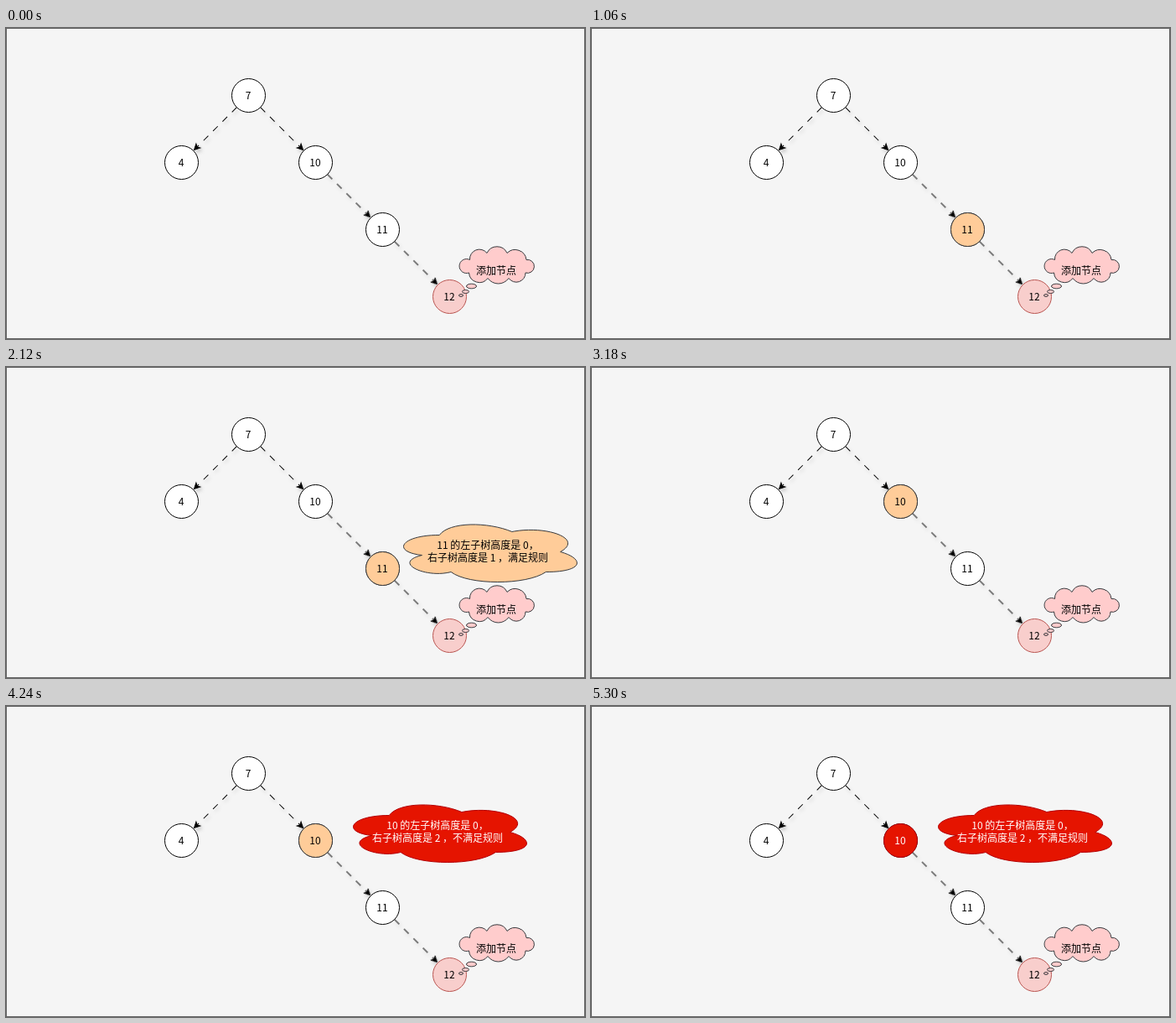
These frames come from a looping animation (691 px wide and 371 px high, 6360 ms). An HTML page:

```html
<!DOCTYPE html>
<html lang="zh-CN">
<head>
<meta charset="utf-8">
<title>二叉树添加节点</title>
<style>
  html, body { margin: 0; width: 100%; height: 100%; overflow: hidden; background: #f5f5f5; }
  svg { display: block; }
  text { font: 12px "Noto Sans CJK SC", "Noto Sans CJK", sans-serif; text-anchor: middle; fill: #000; stroke: none; }
  .plain { fill: #fff; stroke: #000; }
  .added { fill: #f8cecc; stroke: #b85450; }
  .bubble { fill: #fcc; stroke: #36393d; }
  .checked { fill: #fc9; stroke: #36393d; }
  .broken { fill: #e51400; stroke: #b20000; }
  .broken text { fill: #fff; }
  .edges { filter: drop-shadow(2px 3px 2px rgba(0, 0, 0, .2)); }

  /* --at: first step in which the part is visible; each step lasts 1060 ms */
  .step1, .step2 { visibility: hidden; animation: one-step 6360ms step-end calc(var(--at) * 1060ms) infinite; }
  .step2 { animation-name: two-steps; }
  @keyframes one-step { 0% { visibility: visible; } 16.666%, 100% { visibility: hidden; } }
  @keyframes two-steps { 0% { visibility: visible; } 33.333%, 100% { visibility: hidden; } }
</style>
</head>
<body>
<svg width="691" height="371" viewBox="0 0 691 371">
  <defs>
    <circle id="disc" r="20"/>
    <g id="edge" stroke="#000">
      <path d="M20 0H86.77" fill="none" stroke-dasharray="8 8"/>
      <path d="M92.02 0l-7 3.5 1.75-3.5-1.75-3.5z" stroke-miterlimit="10"/>
    </g>
    <path id="cloud" d="M57.75 20C11.55 20 0 40 36.96 44C0 52.8 41.58 72 71.61 64C92.4 80 161.7 80 184.8 64C231 64 231 48 202.125 40C231 24 184.8 8 144.375 16C115.5 4 69.3 4 57.75 20z"/>
  </defs>

  <rect x=".5" y=".5" width="690" height="370" fill="#f5f5f5" stroke="#666"/>

  <g class="edges">
    <use href="#edge" transform="translate(289.5 80.5) rotate(135)"/>
    <use href="#edge" transform="translate(289.5 80.5) rotate(45)"/>
    <use href="#edge" transform="translate(369.5 160.5) rotate(45)"/>
    <use href="#edge" transform="translate(449.5 240.5) rotate(45)"/>
  </g>

  <g class="plain" transform="translate(289.5 80.5)"><use href="#disc"/><text x="-.5" y="4.5">7</text></g>
  <g class="plain" transform="translate(209.5 160.5)"><use href="#disc"/><text x="-.5" y="4.5">4</text></g>
  <g class="plain" transform="translate(369.5 160.5)"><use href="#disc"/><text x="-.5" y="4.5">10</text></g>
  <g class="plain" transform="translate(449.5 240.5)"><use href="#disc"/><text x="-.5" y="4.5">11</text></g>
  <g class="added" transform="translate(529.5 320.5)"><use href="#disc"/><text x="-.5" y="4.5">12</text></g>

  <g class="checked step2" style="--at:1" transform="translate(449.5 240.5)"><use href="#disc"/><text x="-.5" y="4.5">11</text></g>
  <g class="checked step2" style="--at:3" transform="translate(369.5 160.5)"><use href="#disc"/><text x="-.5" y="4.5">10</text></g>
  <g class="broken step1" style="--at:5" transform="translate(369.5 160.5)"><use href="#disc"/><text x="-.5" y="4.5">10</text></g>

  <g class="checked step1" style="--at:2" transform="translate(459.5 180.5)">
    <use href="#cloud"/>
    <text x="115.5" y="36.5">11 的左子树高度是 0，</text>
    <text x="115.5" y="51.5">右子树高度是 1 ，满足规则</text>
  </g>
  <g class="broken step2" style="--at:4" transform="translate(399.5 110.5)" font-weight="500">
    <use href="#cloud"/>
    <text x="115.5" y="36.5" style="font-weight:500">10 的左子树高度是 0，</text>
    <text x="115.5" y="51.5" style="font-weight:500">右子树高度是 2 ，不满足规则</text>
  </g>

  <g class="bubble">
    <path d="M553.5 276.5A11.5 11.5 0 0 1 574 268.5A13.2 13.2 0 0 1 598 268.5A13.5 13.5 0 0 1 621 276.5A8 8 0 1 1 620 292A11 11 0 0 1 600 298.5A15.3 15.3 0 0 1 575 298.5A12.5 12.5 0 0 1 552.5 292A8.5 8.5 0 1 1 553.5 276.5z"/>
    <ellipse cx="555.5" cy="308" rx="6" ry="2.8"/>
    <ellipse cx="548.5" cy="314.5" rx="4" ry="2"/>
    <ellipse cx="543" cy="319" rx="2.5" ry="1.4"/>
    <text x="585" y="294">添加节点</text>
  </g>
</svg>
</body>
</html>
```
